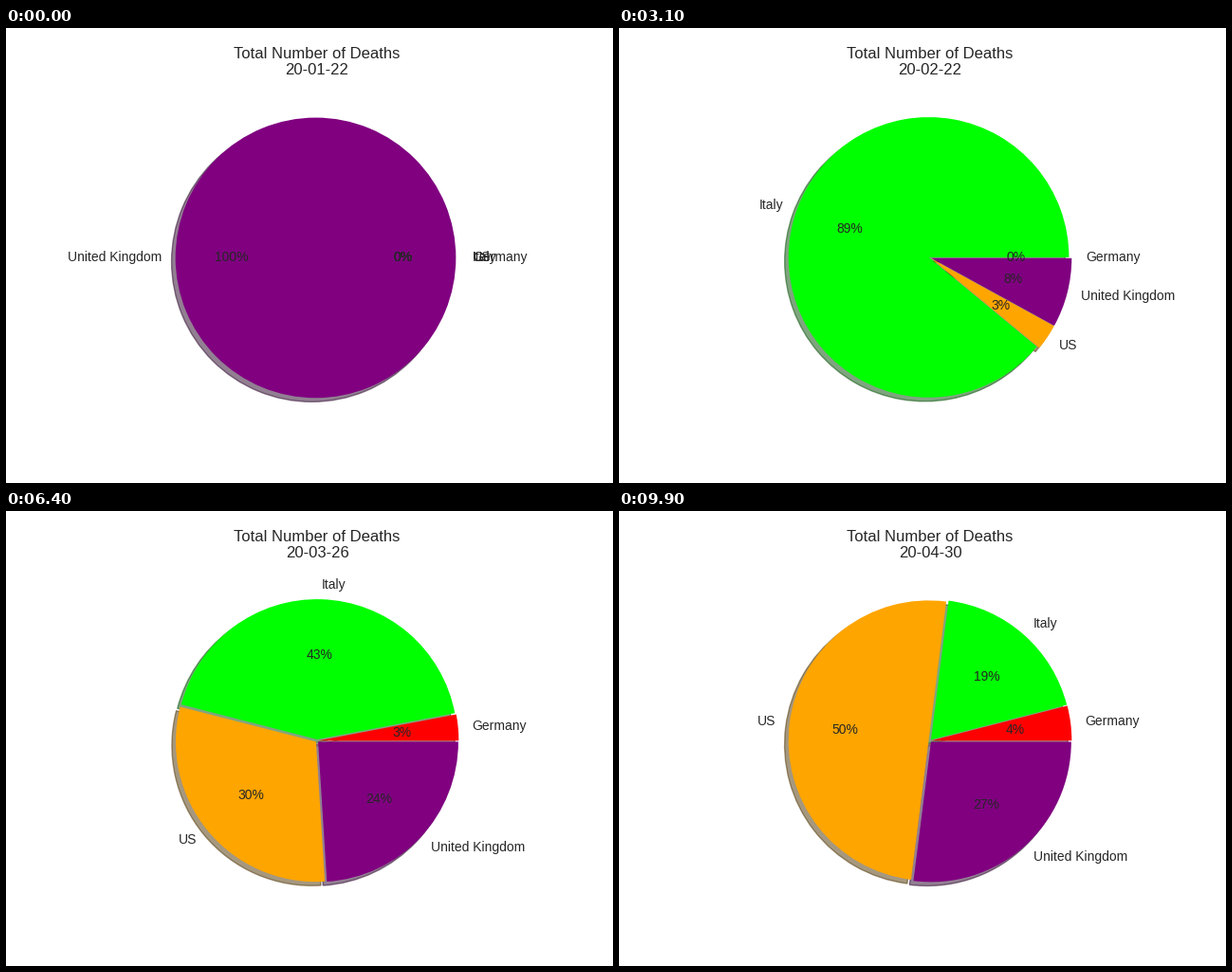
These frames come from a looping animation (640x480 px, 10 s). A matplotlib script:

```python
import numpy as np
import matplotlib.pyplot as plt
from matplotlib.animation import FuncAnimation

plt.rcParams.update({
    "font.family": "Liberation Sans",
    "text.color": "0.15",
    "axes.titlecolor": "0.15",
})

LABELS = ["Germany", "Italy", "US", "United Kingdom"]
COLORS = ["red", "lime", "orange", "purple"]
START = np.datetime64("2020-01-22")
DAYS = 100

# Turning points as (day, percent); Italy takes the rest
GERMANY = [(44, 0), (64, 3), (77, 4)]
US = [(29, 0), (31, 3), (34, 9), (40, 4), (43, 4), (55, 14),
      (64, 30), (72, 38.5), (80, 43.6), (99, 50)]
UK = [(21, 100), (22, 67), (23, 50), (25, 30), (28, 15), (31, 8),
      (33, 5), (43, 4), (55, 14), (64, 24), (80, 28.7), (99, 27)]


def shares(day):
    de, us, uk = (np.interp(day, *zip(*keys)) for keys in (GERMANY, US, UK))
    return np.round([de, 100 - de - us - uk, us, uk])


fig, ax = plt.subplots(figsize=(6.4, 4.8), dpi=100)


def draw(day):
    ax.clear()
    ax.pie(shares(day), labels=LABELS, colors=COLORS, explode=[0.01] * 4,
           autopct="%1.0f%%", shadow=True)
    date = str(START + day)[2:]
    ax.set_title(f"Total Number of Deaths\n{date}", fontsize=12)
    return []


anim = FuncAnimation(fig, draw, frames=DAYS, init_func=lambda: draw(0),
                     interval=100, repeat=True, repeat_delay=0)
plt.show()
```
